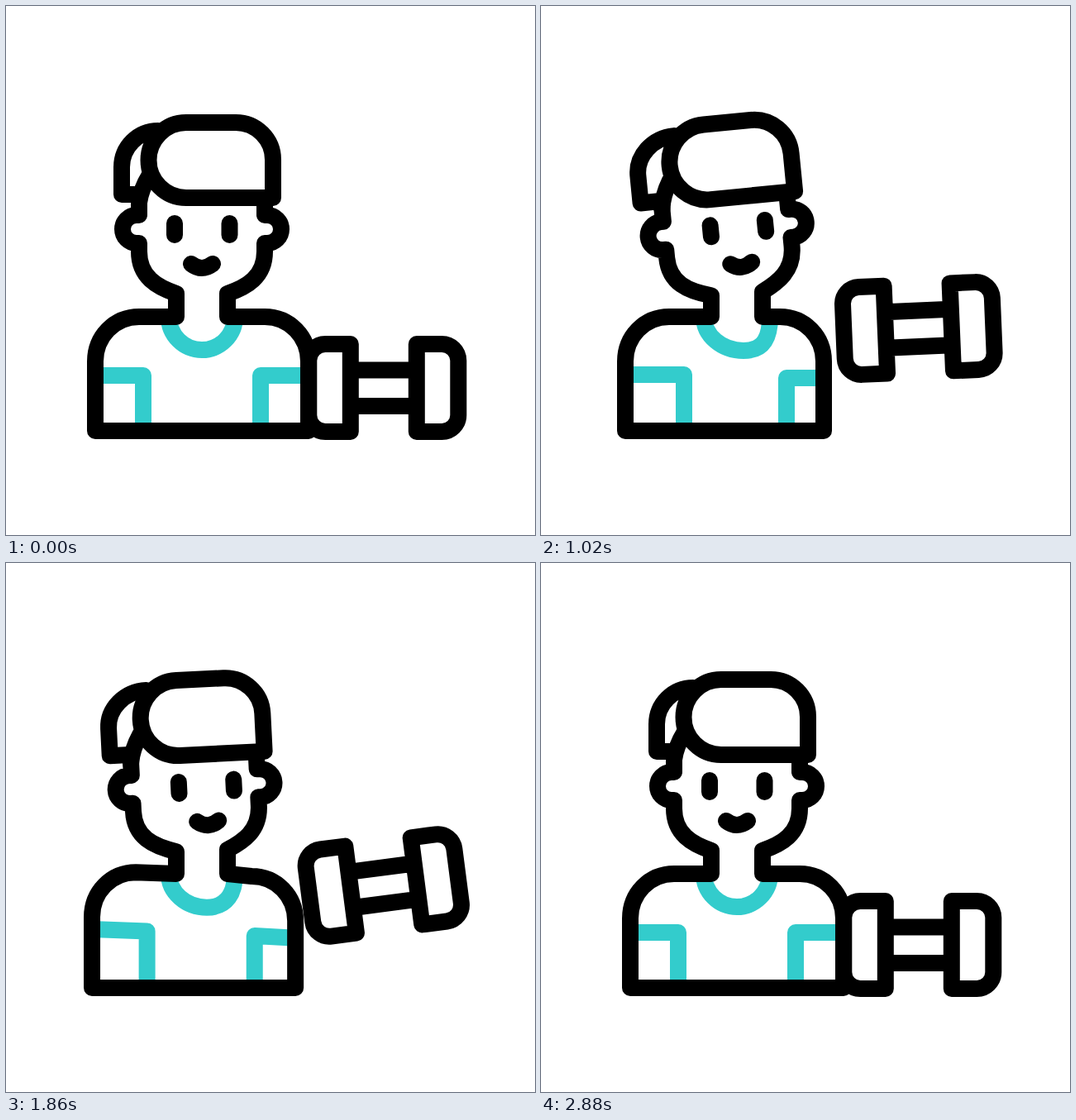
These frames come from a looping animation (640x640 px, 3000 ms). An HTML page:

```html
<!DOCTYPE html>
<html lang="en">
<head>
<meta charset="utf-8">
<title>Workout</title>
<style>
html, body { margin: 0; width: 100%; height: 100%; overflow: hidden; background: #fff; }
svg { display: block; width: 100%; height: 100%; }
path { fill: none; stroke: #000; stroke-width: 20; stroke-linejoin: round; }
.round { stroke-linecap: round; }
#collar, #sleeves { stroke: #3cc; }
#hair { fill: #fff; }
</style>
</head>
<body>
<svg viewBox="0 0 640 640">
  <path id="collar"/>
  <path id="sleeves"/>
  <path id="body"/>
  <path id="jaw"/>
  <g id="head">
    <path id="quiff" class="round"/>
    <path id="hair"/>
    <path id="face" class="round"/>
  </g>
  <path id="dumbbell" d="M-40-53H-70.5A20 20 0 0 0-90.5-33V33A20 20 0 0 0-70.5 53H-40Z
    M40-53H70.5A20 20 0 0 1 90.5-33V33A20 20 0 0 1 70.5 53H40Z M-40-21.5H40M-40 22H40"/>
</svg>
<script>
const LOOP = 3000, STEP = 20;
const $ = id => document.getElementById(id);
const draw = (id, d) => $(id).setAttribute('d', d);
const move = (id, v) => $(id).setAttribute('transform', v);

const clamp = (v, lo, hi) => Math.min(hi, Math.max(lo, v));
const wave = p => .5 - .5 * Math.cos(2 * Math.PI * p);
const ease = (t, from, to) => wave(clamp((t - from) / (to - from), 0, 1) / 2);

// lean: weight moved away from the dumbbell; bob: two breaths while lifting;
// turn: the twist on the way back. Each runs from 0 to 1.
function pose(t) {
  const back = ease(t, 1580, 2200), settle = ease(t, 2200, 2880);
  return {
    lean: ease(t, 100, 440) - .8 * back - .2 * settle,
    bob: wave((clamp(t, 420, 1600) - 420) / 590),
    turn: back - settle
  };
}

function drawBody({ lean, bob, turn }, tilt) {
  const left = 108 - 6 * lean, right = 366 - 24 * lean;
  const neck = 376 - 4.5 * bob, ls = neck - 4 * turn, rs = neck + 7 * turn;

  const cx = 237 + 8 * lean + bob + 1.5 * turn, cy = 416 + lean - 4 * bob;
  const k = .55, mid = neck + (cy - neck) * k;
  draw('collar', `M197 ${neck}C197 ${mid} ${cx - k * (cx - 197)} ${cy} ${cx} ${cy}
    S277 ${mid} 277 ${neck}`);

  const sleeve = 447 - lean - 4 * bob - 2 * turn, cuff = 447 + 3 * lean + 5 * turn;
  draw('sleeves', `M${left} ${sleeve - 2 * bob - 6 * turn}L${166 + 7 * lean} ${sleeve}V514
    M${308 - 11 * lean} 514V${cuff}L${right} ${cuff + 6 * turn}`);

  draw('body', `M206 ${348 - tilt * .4}V${neck}L${left + 53} ${ls}
    C${left + 23} ${ls} ${left} ${ls + 24} ${left} ${ls + 54}V514H${right}V${rs + 54}
    C${right} ${rs + 24} ${right - 23} ${rs} ${right - 53} ${rs}L268 ${neck}V${348 + tilt * .4}`);
}

function drawJaw(shift, tilt) {
  const a = tilt * Math.PI / 180, c = Math.cos(a), s = Math.sin(a);
  // Follows the head but stays attached to the neck; m mirrors the side.
  const side = m => {
    const pt = (x, y) => `${237 + shift + m * x * c - (y - 350) * s} ${350 + m * x * s + (y - 350) * c} `;
    return `M${pt(-76, 236)}L${pt(-76, 253)}L${pt(-79, 253)}
      A17 17 0 0 ${m > 0 ? 0 : 1} ${pt(-79, 287)}L${pt(-76, 287)}L${pt(-76, 297)}
      C${pt(-76, 328)}${pt(-54, 340)}${237 - m * 31} ${348 - m * tilt * .4}V360`;
  };
  draw('jaw', side(1) + side(-1));
}

function drawHead({ lean, bob, turn }, shift, tilt, t) {
  move('head', `translate(${shift})rotate(${tilt} 237 350)`);
  const slide = 4 * lean + bob + 3 * turn, hx = 218 + .7 * slide;
  draw('quiff', `M184 151A${44 + slide} 44 0 0 0 ${140 - slide} 195V228H155M161 238Q163 222 174 204`);
  draw('hair', `M323 232H${hx}A45.5 45.5 0 0 1 ${hx} 141H278A45 45 0 0 1 323 186Z`);

  const blink = mid => Math.min(1, Math.abs(t - mid) / 120);
  const open = 7 * blink(790) * blink(1570);
  const eye = x => `M${x} ${270 - open}v${2 * open}`;
  move('face', `translate(${13 * lean + .5 * bob + 11.6 * turn} ${2 * turn})`);
  draw('face', eye(204) + eye(270.5) + 'M224 312Q237 322 250 312');
}

function drawDumbbell(t) {
  const lift = ease(t, 100, 675) - ease(t, 2200, 2800);
  const swing = 16 * ease(t, 100, 540) - 22 * ease(t, 540, 950) + 20 * ease(t, 950, 1200)
    - 24 * ease(t, 1200, 1570) + 10 * ease(t, 1570, 2420);
  move('dumbbell', `translate(456.8 ${462 - 72 * lift})rotate(${swing})`);
}

function frame(now) {
  const t = Math.floor(now % LOOP / STEP) * STEP, p = pose(t);
  const tilt = -5.6 * p.lean + 2.4 * p.bob + 2 * p.turn;
  const shift = -4 * p.lean - .3 * p.bob - 4.2 * p.turn;
  drawBody(p, tilt);
  drawJaw(shift, tilt);
  drawHead(p, shift, tilt, t);
  drawDumbbell(t);
  requestAnimationFrame(frame);
}
frame(performance.now());
</script>
</body>
</html>
```
